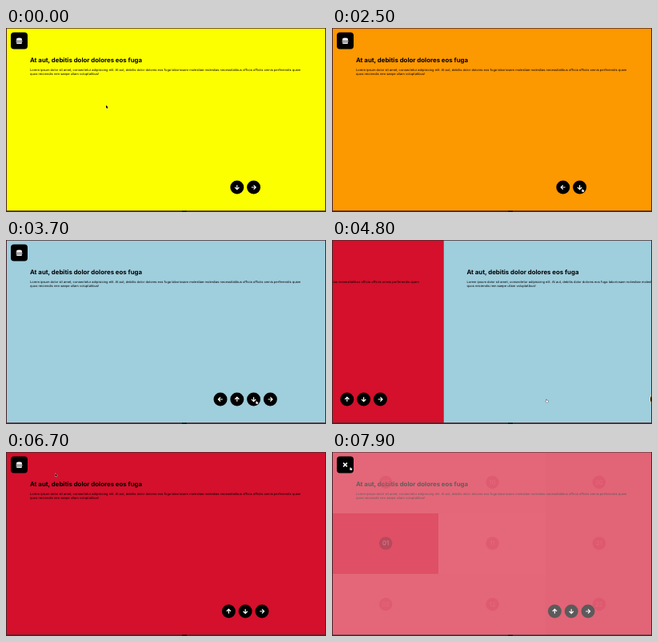
These frames come from a looping animation (400x231 px, 8 s). An HTML page with a canvas:

```html
<!DOCTYPE html>
<html lang="en">
<head>
<meta charset="utf-8">
<title>Sliding rooms</title>
<style>
html, body { margin: 0; width: 100%; height: 100%; overflow: hidden; background: #222; }
canvas { display: block; width: 400px; height: 231px; }
</style>
</head>
<body>
<canvas id="stage"></canvas>
<script>
const W = 400, H = 231, LOOP = 8000;
const VIEW = { x: 1, y: 0.5, w: 398, h: 229 };
const canvas = document.getElementById('stage');
const ctx = canvas.getContext('2d');
const dpr = window.devicePixelRatio || 1;
canvas.width = W * dpr;
canvas.height = H * dpr;

const TITLE = 'At aut, debitis dolor dolores eos fuga';
const LINES = [
  'Lorem ipsum dolor sit amet, consectetur adipisicing elit. At aut, debitis dolor dolores eos fuga laboriosam molestiae molestias necessitatibus officia officiis omnis perferendis quam',
  'quos reiciendis rem saepe ullam voluptatibus!'
];
const LEFT = Math.PI, UP = -Math.PI / 2, DOWN = Math.PI / 2, RIGHT = 0;

const rooms = {
  yellow: { x: 0, y: 0, color: '#fcff00', ways: [DOWN, RIGHT] },
  orange: { x: 1, y: 0, color: '#fc9800', ways: [LEFT, DOWN] },
  blue: { x: 1, y: 1, color: '#9fcedd', ways: [LEFT, UP, DOWN, RIGHT] },
  red: { x: 0, y: 1, color: '#d4102c', ways: [UP, DOWN, RIGHT] }
};
const moves = [
  { at: 1160, from: 'yellow', to: 'orange', way: RIGHT },
  { at: 2600, from: 'orange', to: 'blue', way: DOWN },
  { at: 4578, from: 'blue', to: 'red', way: LEFT }
];
const SLIDE = 1000, MENU_AT = 7650, MENU_FADE = 1000;

// time, x, y
const path = [
  [0, 125, 97], [150, 125, 97], [900, 309, 202], [1500, 309, 202],
  [2300, 313, 203], [3800, 313, 203], [4400, 268, 201], [5700, 268, 201],
  [6700, 61.5, 27], [7150, 23, 20], [8000, 23, 20]
];

const clamp = v => Math.max(0, Math.min(1, v));
const smooth = p => p * p * (3 - 2 * p);

function bezier(x1, y1, x2, y2) {
  const b = (u, p, q) => 3 * (1 - u) * (1 - u) * u * p + 3 * (1 - u) * u * u * q + u * u * u;
  return x => {
    let lo = 0, hi = 1;
    for (let i = 0; i < 24; i++) {
      const mid = (lo + hi) / 2;
      if (b(mid, x1, x2) < x) lo = mid; else hi = mid;
    }
    return b(lo, y1, y2);
  };
}
const ease = bezier(0.25, 0.1, 0.25, 1);

function disc(x, y, r, color) {
  ctx.fillStyle = color;
  ctx.beginPath();
  ctx.arc(x, y, r, 0, Math.PI * 2);
  ctx.fill();
}

// Set large and scaled down, so that small type keeps its true spacing.
function text(str, x, y, size, weight, color, align = 'left') {
  ctx.save();
  ctx.translate(x, y);
  ctx.scale(0.125, 0.125);
  ctx.textRendering = 'geometricPrecision';
  ctx.font = `${weight} ${size * 8}px Inter, sans-serif`;
  ctx.textAlign = align;
  ctx.fillStyle = color;
  ctx.fillText(str, 0, 0);
  ctx.restore();
}

function arrow(x, y, angle, focused) {
  if (focused) disc(x, y, 9.4, '#ffe9a8');
  disc(x, y, 8.5, '#000');
  ctx.save();
  ctx.translate(x, y);
  ctx.rotate(angle);
  ctx.strokeStyle = '#fff';
  ctx.lineWidth = 1.2;
  ctx.beginPath();
  ctx.moveTo(-2.8, 0);
  ctx.lineTo(2.5, 0);
  ctx.moveTo(0, -2.6);
  ctx.lineTo(2.6, 0);
  ctx.lineTo(0, 2.6);
  ctx.stroke();
  ctx.restore();
}

function menuButton(open) {
  ctx.fillStyle = '#000';
  ctx.beginPath();
  ctx.roundRect(6, 5.5, 21, 21, 4);
  ctx.fill();
  ctx.save();
  ctx.translate(16.5, 16);
  if (open) {
    ctx.strokeStyle = '#fff';
    ctx.lineWidth = 1.5;
    ctx.beginPath();
    ctx.moveTo(-2.4, -2.4);
    ctx.lineTo(2.4, 2.4);
    ctx.moveTo(2.4, -2.4);
    ctx.lineTo(-2.4, 2.4);
    ctx.stroke();
  } else {
    ctx.fillStyle = '#fff';
    ctx.beginPath();
    ctx.roundRect(-3.6, -3.5, 7.2, 2.7, [2.6, 2.6, 0.5, 0.5]);
    ctx.roundRect(-4, -0.2, 8, 1.2, 0.6);
    ctx.roundRect(-3.6, 1.7, 7.2, 2, [0.4, 0.4, 1.5, 1.5]);
    ctx.fill();
  }
  ctx.restore();
}

function drawRoom(room, x, y, { menu = false, clicked = null } = {}) {
  ctx.save();
  ctx.translate(x, y);
  ctx.fillStyle = room.color;
  ctx.fillRect(VIEW.x, VIEW.y, VIEW.w, VIEW.h);
  text(TITLE, 30, 43, 7.82, 700, '#000');
  LINES.forEach((line, i) => text(line, 30, 53.8 + i * 5, 4, 400, '#000'));
  room.ways.forEach((way, i) =>
    arrow(299.2 + (i - (room.ways.length - 1) / 2) * 20.8, 200, way, way === clicked));
  if (menu) menuButton(false);
  ctx.restore();
}

function drawMenu(alpha) {
  ctx.save();
  ctx.globalAlpha = alpha;
  const w = W / 3, h = 230 / 3;
  for (let row = 0; row < 3; row++) {
    for (let col = 0; col < 3; col++) {
      const here = col === 0 && row === 1;
      const x = Math.round(col * w), y = Math.round(row * h);
      ctx.fillStyle = here ? '#f0bcc9' : col === 2 ? '#faf4f6' : row === 1 ? '#fff' : '#fffbfc';
      ctx.fillRect(x, y, Math.round((col + 1) * w) - x, Math.round((row + 1) * h) - y);
      const cx = (col + 0.5) * w + 0.5, cy = (row + 0.5) * h - 0.4;
      disc(cx, cy, 8.2, here ? '#79404c' : '#d6485f');
      text(`${col}${row}`, cx, cy + 2.8, 7.8, 400, here ? '#fff' : '#ee8499', 'center');
    }
  }
  ctx.restore();
}

function drawCursor(t) {
  let i = 0;
  while (i < path.length - 2 && t >= path[i + 1][0]) i++;
  const [t0, x0, y0] = path[i], [t1, x1, y1] = path[i + 1];
  const p = smooth(clamp((t - t0) / (t1 - t0)));
  const hand = (t > 820 && t < 5800) || t > 7050;
  ctx.save();
  ctx.translate(x0 + (x1 - x0) * p, y0 + (y1 - y0) * p);
  ctx.lineJoin = 'round';
  ctx.lineWidth = 0.8;
  ctx.beginPath();
  if (hand) {
    ctx.roundRect(-0.5, -0.8, 1, 2.4, 0.5);
    ctx.roundRect(-0.7, 0.4, 2.9, 2.3, 0.9);
    ctx.strokeStyle = '#222';
    ctx.fillStyle = '#fff';
  } else {
    ctx.moveTo(0, 0);
    ctx.lineTo(0, 3.6);
    ctx.lineTo(0.9, 2.9);
    ctx.lineTo(1.5, 4.2);
    ctx.lineTo(2.1, 3.9);
    ctx.lineTo(1.6, 2.6);
    ctx.lineTo(2.7, 2.5);
    ctx.closePath();
    ctx.strokeStyle = '#ddd';
    ctx.fillStyle = '#000';
  }
  ctx.stroke();
  ctx.fill();
  ctx.restore();
}

function drawRooms(t) {
  const move = moves.filter(m => t >= m.at).pop();
  if (!move) return drawRoom(rooms.yellow, 0, 0, { menu: true });
  const from = rooms[move.from], to = rooms[move.to];
  const p = clamp((t - move.at) / SLIDE), e = ease(p);
  const dx = (to.x - from.x) * VIEW.w, dy = (to.y - from.y) * VIEW.h;
  if (p < 1) drawRoom(from, -dx * e, -dy * e, { clicked: move.way });
  const rest = p < 1 ? 1 - e : 0;
  drawRoom(to, dx * rest, dy * rest, { menu: t < MENU_AT });
}

function draw(t) {
  ctx.setTransform(dpr, 0, 0, dpr, 0, 0);
  ctx.fillStyle = '#4a2428';
  ctx.fillRect(0, 0, W, H);
  ctx.fillStyle = '#111';
  ctx.fillRect(220, 229, 6, 2);
  ctx.save();
  ctx.beginPath();
  ctx.rect(VIEW.x, VIEW.y, VIEW.w, VIEW.h);
  ctx.clip();
  drawRooms(t);
  if (t >= MENU_AT) {
    drawMenu(0.9 * ease(clamp((t - MENU_AT) / MENU_FADE)));
    menuButton(true);
  }
  ctx.restore();
  drawCursor(t);
}

const start = performance.now();
function tick() {
  draw((performance.now() - start) % LOOP);
  requestAnimationFrame(tick);
}
tick();
</script>
</body>
</html>
```
